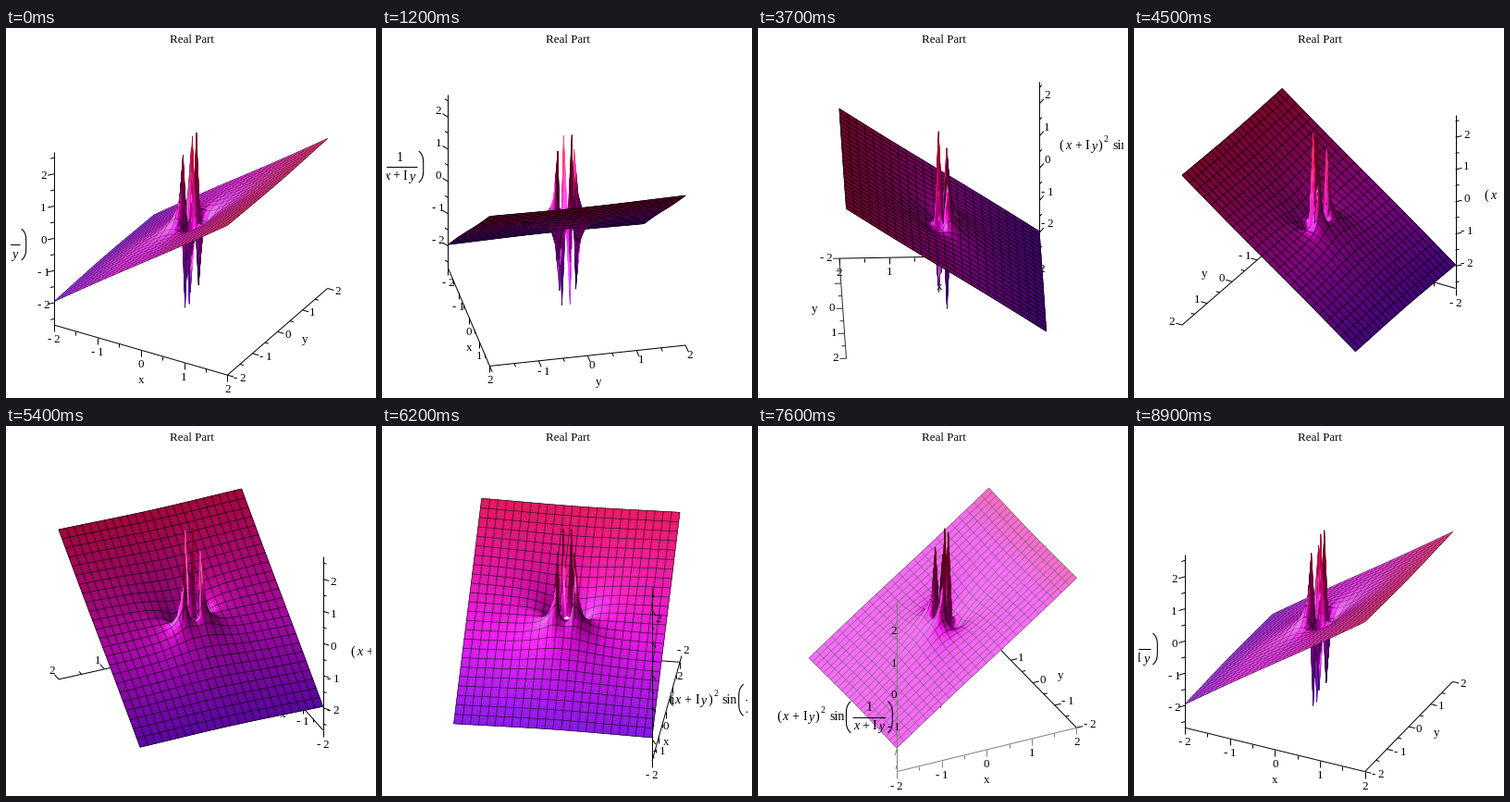
Recreate the animation shown at these times as a matplotlib script. Size 400 by 400 pixels, loop 9 s.

```python
import numpy as np
import matplotlib.pyplot as plt
from matplotlib.animation import FuncAnimation
from matplotlib.collections import PolyCollection
from matplotlib.colors import hsv_to_rgb
from matplotlib.patches import Rectangle

FRAMES = 90
SIDE = 216.4                      # box edge in pixels
CENTER = np.array([199.8, 207.6])
SIN_E, COS_E = 0.5, np.sqrt(0.75)
LIGHT = np.array([-0.66, 0.50, 0.56])   # right, up, towards the viewer
PX = 0.72                         # points per pixel
STEEP = 0.05                      # height above which a cell is subdivided

plt.rcParams["font.family"] = "Liberation Serif"
fig = plt.figure(figsize=(4, 4), dpi=100, facecolor="white")
ax = fig.add_axes([0, 0, 1, 1])
ax.set_xlim(0, 400)
ax.set_ylim(400, 0)
ax.axis("off")

# Surface: Re(w^2 sin(1/w)) on a 49 x 49 grid, undefined at the origin
N = 49
g = np.linspace(-2, 2, N)
X, Y = np.meshgrid(g, g, indexing="ij")
W = X + 1j * Y
W[N // 2, N // 2] = np.nan
Z = (W ** 2 * np.sin(1 / W)).real
ZMAX = np.nanmax(np.abs(Z))
P = np.stack([X / 4, Y / 4, Z / (2 * ZMAX)], axis=-1)


def cells(grid):
    """Corners of every cell; an undefined corner collapses on its neighbour."""
    quads = np.stack([grid[:-1, :-1], grid[1:, :-1],
                      grid[1:, 1:], grid[:-1, 1:]], axis=2)
    bad = np.isnan(quads[..., 2])
    quads[bad] = np.roll(quads, 1, axis=2)[bad]
    return quads


def normalize(v):
    return v / np.linalg.norm(v, axis=-1, keepdims=True)


def vertex_normals():
    q = cells(P)
    n = normalize(np.cross(q[:, :, 2] - q[:, :, 0], q[:, :, 3] - q[:, :, 1]))
    total = np.zeros_like(P)
    for a in (slice(0, -1), slice(1, None)):
        for b in (slice(0, -1), slice(1, None)):
            total[a, b] += n
    return normalize(total)


def subdivide(quad, k=6):
    u, v = np.meshgrid(*[np.linspace(0, 1, k + 1)] * 2, indexing="ij")
    weights = np.stack([(1 - u) * (1 - v), u * (1 - v), u * v, (1 - u) * v], -1)
    return cells(weights @ quad).reshape(-1, 4, 6)


def make_faces(verts):
    quads = cells(verts).reshape(-1, 4, 6)
    steep = np.ptp(quads[:, :, 2], axis=1) > STEEP
    return np.concatenate([quads[~steep]] + [subdivide(q) for q in quads[steep]])


def make_lines(verts):
    rows = []
    for v in (verts, verts.swapaxes(0, 1)):
        p, q = v[::2, :-1], v[::2, 1:]
        rows.append(np.stack([p, q, q, p], axis=2).reshape(-1, 4, 6))
    segs = np.concatenate(rows)
    return segs[~np.isnan(segs[:, :, 2]).any(axis=1)]


verts = np.concatenate([P, vertex_normals()], axis=-1)
faces, lines = make_faces(verts), make_lines(verts)
both = np.concatenate([faces, lines])
shapes, normals = both[:, :, :3], normalize(both[:, :, 3:].mean(axis=1))
level = faces[:, :, 2].mean(axis=1) + 0.5
base = hsv_to_rgb(np.stack([(259 + 94 * level) / 360,
                            np.ones_like(level), np.ones_like(level)], -1))
widths = np.r_[np.full(len(faces), 0.5), np.full(len(lines), 0.65)] * PX


def camera(a):
    c, s = np.cos(a), np.sin(a)
    return (np.array([c, s, 0]),
            np.array([s * SIN_E, -c * SIN_E, -COS_E]),
            np.array([s * COS_E, -c * COS_E, SIN_E]))


def unit(v):
    return v / np.hypot(*v)


drawn = []


def text(pos, s, size=13, style="normal", z=7):
    drawn.append(ax.text(pos[0], pos[1], s, fontsize=size * PX, style=style,
                         ha="center", va="center", color="black", zorder=z))


def line(xs, ys, color="black", width=1.0, z=7):
    drawn.extend(ax.plot(xs, ys, color=color, lw=width * PX, zorder=z,
                         solid_capstyle="butt"))


def draw_surface(right, down, view):
    n = normals @ np.stack([right, -down, view], axis=1)
    n *= np.where(n[:, 2:] < 0, -1, 1)
    lit = np.clip(n @ LIGHT, 0, 1)[:, None]
    colors = np.repeat(0.44 * lit ** 6, 3, axis=1)
    shade = 0.35 + 0.2 * lit + 0.55 * lit ** 2
    colors[:len(faces)] += base * shade[:len(faces)]
    colors = np.clip(colors, 0, 1)

    flat = CENTER + SIDE * np.stack([shapes @ right, shapes @ down], axis=-1)
    depth = (shapes @ view).mean(axis=1)
    depth[len(faces):] += 0.015
    order = np.argsort(depth)
    drawn.append(ax.add_collection(PolyCollection(
        flat[order], facecolors=colors[order], edgecolors=colors[order],
        linewidths=widths[order], zorder=5), autolim=False))


def draw_axis(start, end, limit, ticks, way, gray, z):
    """Draw a line with ticks and return the places of the whole numbers."""
    line([start[0], end[0]], [start[1], end[1]], str(gray), z=z)
    spots = {}
    for v in ticks:
        p = start + (end - start) * (v + limit) / (2 * limit)
        whole = v == int(v)
        q = p + way * (7 if whole else 4)
        line([p[0], q[0]], [p[1], q[1]], str(gray), z=z)
        if whole:
            spots[int(v)] = p
    return spots


def number(v):
    return f"-\u2009{-v}" if v < 0 else str(v)


def draw_formula(c):
    glyphs = [("(", -60, 0), ("x", -53, 0), ("+", -42, 0), ("I", -32, 0),
              ("y", -25, 1), (")", -18, 0), ("sin", 3, 0), ("1", 38, -10),
              ("x", 24, 10), ("+", 34, 10), ("I", 43, 10), ("y", 51, 11)]
    for s, dx, dy in glyphs:
        text(c + (dx, dy), s, 14, "italic" if s in "xy" else "normal")
    text(c + (-12, -7), "2", 10)
    line(c[0] + np.array([20, 56]), [c[1], c[1]])
    t = np.linspace(-1, 1, 25)
    for x, bow in ((18, -5), (58, 5)):
        line(c[0] + x + bow * (1 - t ** 4), c[1] + 17 * t, width=1.1)


def glint(a, peak):
    return round(0.5 * max(0, np.cos(a - np.radians(peak))) ** 6, 3)


def draw_axes(a, right, down):
    def at(x, y, z):
        p = np.array([x, y, z]) / 2
        return CENTER + SIDE * np.array([p @ right, p @ down])

    ex = unit(np.array([right[0], down[0]]))
    ey = unit(np.array([right[1], down[1]]))
    out = unit(-ex - ey)
    low = np.array([0, 1])
    c, s = np.cos(a), np.sin(a)
    zx, zy = 6 if c > 0 else 3, 6 if s > 0 else 3
    zz = 6 if c > 0 or s < 0 else 3
    half = np.arange(-4, 5) / 2
    corner, turn = at(-1, -1, -1), at(1, -1, -1)
    xs = draw_axis(corner, turn, 2, half, low, glint(a, 334), zx)
    ys = draw_axis(turn, at(1, 1, -1), 2, half, ex, glint(a, 146), zy)
    zs = draw_axis(corner, at(-1, -1, 1), ZMAX, np.arange(-5, 6) / 2, out,
                   glint(a, 334), zz)

    taken = []

    def label(v, pos, gap, z):
        if all(np.hypot(*(pos - t)) > gap for t in taken):
            text(pos, number(v), z=z)
            return [pos]
        return []

    for v, p in xs.items():
        label(v, p + 16 * low, 0, zx)
    taken += [p + 16 * low for p in xs.values()]
    placed = []
    for v, p in ys.items():
        push = 11.5 + (3 * abs(ex[0]) if v < 0 else 0)
        placed += label(v, p + push * ex, 10 if v == -2 else 25, zy)
    taken += placed
    for v, p in zs.items():
        label(v, p + 12 * out, 30, zz)

    text(xs[0] + 33 * low, "x", z=zx)
    text(ys[0] + 31 * ex, "y", z=zy)
    draw_formula(zs[0] + (31 * out[0] + 63 * np.clip(3.4 * out[0], -1, 1),
                          31 * out[1] + 6 * out[1] ** 5))


def update(i):
    while drawn:
        drawn.pop().remove()
    a = np.radians(30 + 360 * i / FRAMES)
    right, down, view = camera(a)
    draw_surface(right, down, view)
    draw_axes(a, right, down)
    return drawn


ax.text(201, 13, "Real Part", fontsize=13 * PX, ha="center", va="center")
for x in (0, 395):
    ax.add_patch(Rectangle((x, 0), 5, 400, color="white", lw=0, zorder=20))

anim = FuncAnimation(fig, update, frames=FRAMES, interval=100,
                     init_func=lambda: [], repeat=True, repeat_delay=0,
                     blit=False)
plt.show()
```
